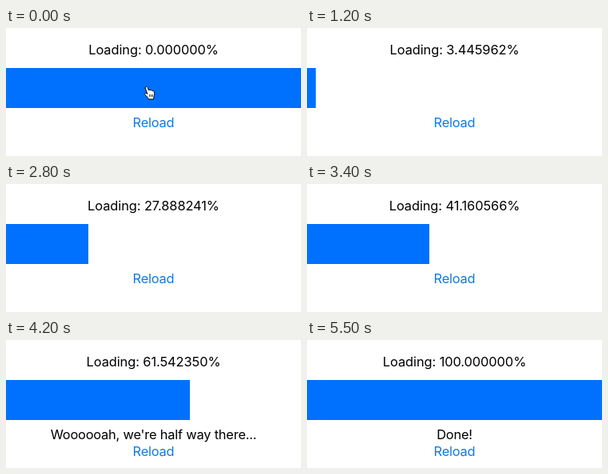
These frames come from a looping animation (369 by 160 pixels, 6500 ms). An HTML page:

```html
<!DOCTYPE html>
<html lang="en">
<head>
<meta charset="utf-8">
<title>Loading bar</title>
<style>
  html, body { margin: 0; height: 100%; overflow: hidden; background: #fff; }
  svg { display: block; width: 369px; height: 160px; }
  text { font: 16.4px Inter, "Open Sans", sans-serif; letter-spacing: -.2px; text-anchor: middle; }
  #label { letter-spacing: -.08px; }
</style>
</head>
<body>
<svg viewBox="0 0 369 160">
  <text id="label" x="184.5" y="33"></text>
  <rect id="bar" x="-2.5" y="50" height="50" fill="#0070ff" shape-rendering="crispEdges"/>
  <text id="note" x="184.5" y="124"></text>
  <text id="reload" x="184.5" fill="#0d7ae6">Reload</text>
  <g id="hand" fill="#fff" stroke="#000" stroke-linejoin="round">
    <path d="M3 1.5c1-.5 2 0 2.3 1L6.5 6c.3-1 2-1 2.4.1 .6-.8 1.9-.6 2.3.6 .8-.5 1.9 0 2.1 1 .5 2 .6 4.2-.2 6l-.6 3.3H6.5C5.5 14.8 3.5 13 2 11.2c-1-1.2.4-2.6 1.7-1.6l1.2 1L2.2 3c-.2-.7.2-1.3.8-1.5z"/>
    <path d="M7.5 11v3M9.5 11v3M11.5 11v3" stroke-width=".8"/>
  </g>
</svg>
<script>
const LOOP = 6500, STEP = 100, START = 473.57127, DURATION = 5000, BAR = 378;
const $ = id => document.getElementById(id);
const clamp = v => Math.min(1, Math.max(0, v));
const smooth = s => s * s * (3 - 2 * s);

// cubic-bezier(.42, 0, 1, 1), solved by bisection
function easeIn(x) {
  if (x <= 0 || x >= 1) return clamp(x);
  let lo = 0, hi = 1, s;
  for (let i = 0; i < 40; i++) {
    s = (lo + hi) / 2;
    if (1.26 * s + .48 * s ** 2 - .74 * s ** 3 < x) lo = s; else hi = s;
  }
  return smooth(s);
}

function draw(t) {
  const done = easeIn((t - START) / DURATION);
  const note = done >= 1 ? "Done!" : done >= .5 ? "Woooooah, we're half way there..." : "";
  $("label").textContent = `Loading: ${(100 * done).toFixed(6)}%`;
  $("bar").setAttribute("width", BAR * (t < START ? 1 : done));
  $("note").textContent = note;
  $("reload").setAttribute("y", note ? 145 : 124);

  const k = smooth(clamp(t / 300));
  $("hand").setAttribute("transform", `translate(${172 + 4 * k} ${72 + 53 * k})`);
  $("hand").setAttribute("visibility", t < 800 ? "visible" : "hidden");
}

const origin = performance.now();
function tick() {
  const t = (performance.now() - origin) % LOOP;
  draw(Math.floor(t / STEP) * STEP);
  requestAnimationFrame(tick);
}
tick();
</script>
</body>
</html>
```
